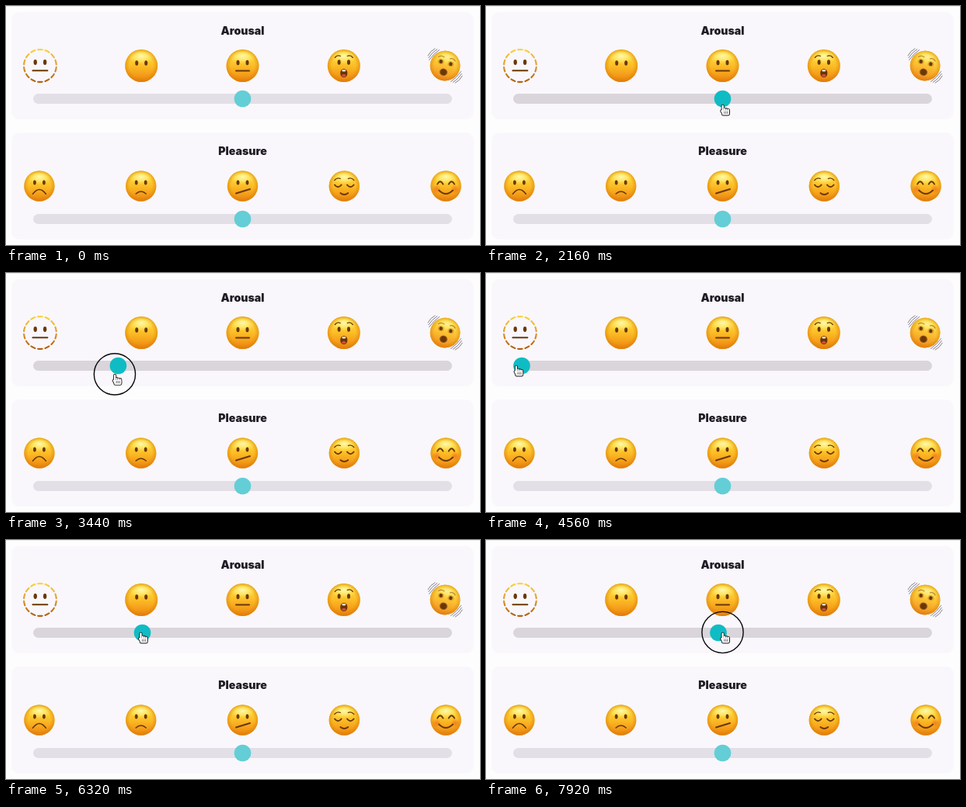
Write an HTML page with a canvas that moves like this. It is 610 px wide and 308 px high and loops after 8 s.

```html
<!DOCTYPE html>
<html lang="en">
<head>
<meta charset="utf-8">
<title>Mood sliders</title>
<style>
html, body { margin: 0; width: 100%; height: 100%; overflow: hidden; background: #fdfdfd; }
canvas { display: block; width: 610px; height: 308px; }
</style>
</head>
<body>
<canvas id="stage"></canvas>
<script>
const W = 610, H = 308, LOOP = 8000, STEP = 80;
const MIDDLE = 304.5, BROWN = '#693808';
const canvas = document.getElementById('stage');
const ctx = canvas.getContext('2d');
const dpr = window.devicePixelRatio || 1;
canvas.width = W * dpr;
canvas.height = H * dpr;

// Each drag moves the knob and the pointer to new x positions
const drags = [
  { start: 2745, end: 3867, knob: 46, tip: 38.8 },
  { start: 5300, end: 5960, knob: 175.5, tip: 173.3 },
  { start: 6640, end: 7360, knob: 280, tip: 283 },
  { start: 7520, end: 7920, knob: 299, tip: 304.5 },
];
const presses = [[2400, 4480], [5200, 6240], [6560, LOOP]];
const enter = { start: 400, end: 1320 };

const lerp = (a, b, p) => a + (b - a) * p;
const progress = (t, a, b) => Math.min(1, Math.max(0, (t - a) / (b - a)));
const mix = (a, b, p) => `rgb(${a.map((v, i) => Math.round(lerp(v, b[i], p)))})`;

function dragged(part, from, t) {
  return drags.reduce((x, d) => lerp(x, d[part], progress(t, d.start, d.end)), from);
}

function tipAt(t) {
  const come = 1 - (1 - progress(t, enter.start, enter.end)) ** 2;
  const first = progress(t, drags[0].start, drags[0].end);
  return {
    x: dragged('tip', lerp(324, 304.5, come), t),
    y: lerp(275, 127, come) - 8 * first + 9 * Math.sin(Math.PI * first),
  };
}

function gradient(g, ...colors) {
  colors.forEach((c, i) => g.addColorStop(i / (colors.length - 1), c));
  return g;
}

function oval(x, y, rx, ry, fill) {
  ctx.beginPath();
  ctx.ellipse(x, y, rx, ry, 0, 0, Math.PI * 2);
  ctx.fillStyle = fill;
  ctx.fill();
}

const disc = (x, y, r, fill) => oval(x, y, r, r, fill);

function box(x, y, w, h, r, fill) {
  ctx.beginPath();
  ctx.roundRect(x, y, w, h, r);
  ctx.fillStyle = fill;
  ctx.fill();
}

// Stroke between two points, bent by a control point
function curve(x1, y1, cx, cy, x2, y2, width = 1.6, color = BROWN) {
  ctx.beginPath();
  ctx.moveTo(x1, y1);
  ctx.quadraticCurveTo(cx, cy, x2, y2);
  ctx.lineCap = 'round';
  ctx.lineWidth = width;
  ctx.strokeStyle = color;
  ctx.stroke();
}

function line(x1, y1, x2, y2, width, color) {
  curve(x1, y1, x1, y1, x2, y2, width, color);
}

// Mirrored arc: ends at height y, control point at height bend
function mouth(half, y, bend, width) {
  curve(-half, y, 0, bend, half, y, width);
}

function pair(draw) {
  draw(-1);
  draw(1);
}

function eyes(y, dx = 6, rx = 2, ry = 3.2) {
  pair(s => oval(s * dx, y, rx, ry, BROWN));
}

function ball(r) {
  disc(0, 0, r, gradient(ctx.createLinearGradient(0, -r, 0, r),
    '#fbd436', '#fed239', '#fcbd26', '#f5a01a', '#e87f0c'));
  disc(0, 0, r, gradient(ctx.createRadialGradient(0, 0, r * 0.72, 0, 0, r),
    'rgba(216,124,8,0)', 'rgba(216,124,8,.55)'));
  ctx.save();
  ctx.translate(0, -r * 0.52);
  ctx.scale(1, 0.58);
  disc(0, 0, r * 0.76, gradient(ctx.createRadialGradient(0, -r * 0.15, 0, 0, 0, r * 0.76),
    'rgba(255,252,190,.9)', 'rgba(255,246,140,.6)', 'rgba(255,236,90,0)'));
  ctx.restore();
}

function dotted() {
  const part = Math.PI / 7;
  ctx.lineWidth = 2.1;
  ctx.lineCap = 'round';
  ctx.strokeStyle = gradient(ctx.createLinearGradient(0, -21, 0, 21), '#fbd33f', '#dc9732', '#b4600f');
  for (let i = 0; i < 14; i++) {
    ctx.beginPath();
    ctx.arc(0, 0, 20.9, (i + 0.2) * part, (i + 0.8) * part);
    ctx.stroke();
  }
  eyes(-4.5, 6.2, 2.2, 3.4);
  line(-9.5, 6.3, 9.5, 6.3, 2);
}

function mute() {
  ball(21);
  eyes(-3.5);
}

function neutral() {
  ball(21);
  eyes(-4);
  line(-8.5, 6.5, 8.5, 6.5, 2);
}

function amazed() {
  ball(21);
  eyes(-4.5, 6.2);
  pair(s => curve(s * 4.5, -12.5, s * 8.5, -14.5, s * 11.5, -10.5, 1.3));
  oval(0, 9.5, 4.6, 5.6, '#6a3209');
  oval(0, 6.3, 2.6, 1.2, '#fff3d8');
  oval(0, 12.6, 2.8, 1.8, '#c9503a');
}

function shaking() {
  ctx.save();
  ctx.rotate(0.25);
  ctx.globalAlpha = 0.4;
  for (const turn of [-0.25, 0.5, -0.25]) {
    ctx.rotate(turn);
    ball(19.3);
  }
  ctx.globalAlpha = 0.7;
  ball(19.3);
  pair(s => oval(s * 6.5, -4, 4, 3.5, 'rgba(176,108,14,.55)'));
  pair(s => curve(s * 4, -10.5, s * 8, -12.5, s * 11, -9, 1.3, '#a3671a'));
  ctx.globalAlpha = 1;
  eyes(-4, 6.5, 2.2, 2.4);
  oval(0, 8.5, 5.2, 4.6, '#a05c14');
  oval(0, 8.5, 3.8, 3.8, BROWN);
  ctx.restore();
  pair(s => {
    for (let i = 0; i < 3; i++) {
      const d = s * (14 + i * 1.8), half = 6.5 - i;
      curve(d - half, d + half, d * 1.08, d * 1.08, d + half, d - half, 0.9, '#77747d');
    }
  });
}

function frown() {
  ball(19.7);
  eyes(-4.5, 6, 1.9, 2.9);
  mouth(8.5, 10.3, -1.5, 1.5);
}

function slightFrown() {
  ball(19.7);
  eyes(-4.5, 6, 1.9, 2.9);
  mouth(6.5, 10, 4, 1.6);
}

function skewed() {
  ball(19.7);
  eyes(-4.5, 6, 1.9, 2.9);
  line(-8.5, 9.5, 9.5, 4, 1.9);
}

function relieved() {
  ball(19.7);
  pair(s => {
    curve(s * 5, -9.5, s * 9, -11.5, s * 12.5, -7.5, 1.3);
    curve(s * 3.7, -1.5, s * 8, 4, s * 12.3, -1.5, 1.9);
  });
  mouth(5, 9, 13, 1.7);
}

function happy() {
  ball(19.7);
  pair(s => {
    disc(s * 12, 4, 6, gradient(ctx.createRadialGradient(s * 12, 4, 0, s * 12, 4, 6),
      'rgba(240,84,30,.55)', 'rgba(240,84,30,0)'));
    curve(s * 3.6, -2.4, s * 7.3, -9, s * 11, -2.4, 1.9);
  });
  mouth(9, 5.5, 14.5, 1.8);
}

function slider(top, title, faces, knobX, hover) {
  box(7, top, 595, 138, 10, '#f9f7fc');
  ctx.font = '900 14.2px Inter, sans-serif';
  ctx.textAlign = 'center';
  ctx.fillStyle = '#201d25';
  ctx.fillText(title, MIDDLE, top + 29.4);
  const gap = title === 'Arousal' ? 130.3 : 130.8;
  faces.forEach((face, i) => {
    ctx.save();
    ctx.translate(MIDDLE + (i - 2) * gap, top + 69);
    face();
    ctx.restore();
  });
  box(35, top + 105, 539, 13, 6.5, mix([226, 223, 230], [217, 213, 219], hover));
  disc(knobX, top + 111.5, 10.8, mix([99, 206, 214], [15, 188, 196], hover));
}

// Hand made of rounded parts: a dark outline below, white above
function hand(x, y) {
  ctx.save();
  ctx.translate(x, y);
  for (const [grow, color] of [[0.9, '#151517'], [0, '#fff']]) {
    const part = (px, py, w, h) =>
      box(px - grow, py - grow, w + 2 * grow, h + 2 * grow, 1.3 + grow, color);
    part(-1, 0.6, 2.3, 10);
    for (let i = 0; i < 3; i++) part(1.6 + i * 2.4, 4.6 + i * 0.6, 2, 6);
    part(-0.6, 7.5, 9, 6);
    ctx.save();
    ctx.rotate(-0.6);
    part(-6.8, 5, 2.4, 6);
    ctx.restore();
  }
  for (let i = 0; i < 3; i++) line(2.2 + i * 2, 9, 2.2 + i * 2, 11.5, 0.7, '#333');
  ctx.restore();
}

const arousal = [dotted, mute, neutral, amazed, shaking];
const pleasure = [frown, slightFrown, skewed, relieved, happy];

function draw(t) {
  ctx.setTransform(dpr, 0, 0, dpr, 0, 0);
  ctx.fillStyle = '#fdfdfd';
  ctx.fillRect(0, 0, W, H);
  ctx.fillStyle = '#ebebed';
  ctx.fillRect(0, 0, W, 1);
  slider(8, 'Arousal', arousal, dragged('knob', MIDDLE, t), progress(t, 1200, 1440));
  slider(163, 'Pleasure', pleasure, MIDDLE, 0);
  if (t < enter.start) return;
  const tip = tipAt(t);
  if (presses.some(([down, up]) => t >= down && t < up)) {
    ctx.beginPath();
    ctx.arc(tip.x, tip.y, 26.6, 0, Math.PI * 2);
    ctx.lineWidth = 1.4;
    ctx.strokeStyle = '#08080a';
    ctx.stroke();
  }
  hand(tip.x, tip.y);
}

function tick() {
  const t = performance.now() % LOOP;
  draw(Math.floor(t / STEP) * STEP);
  requestAnimationFrame(tick);
}
tick();
</script>
</body>
</html>
```
